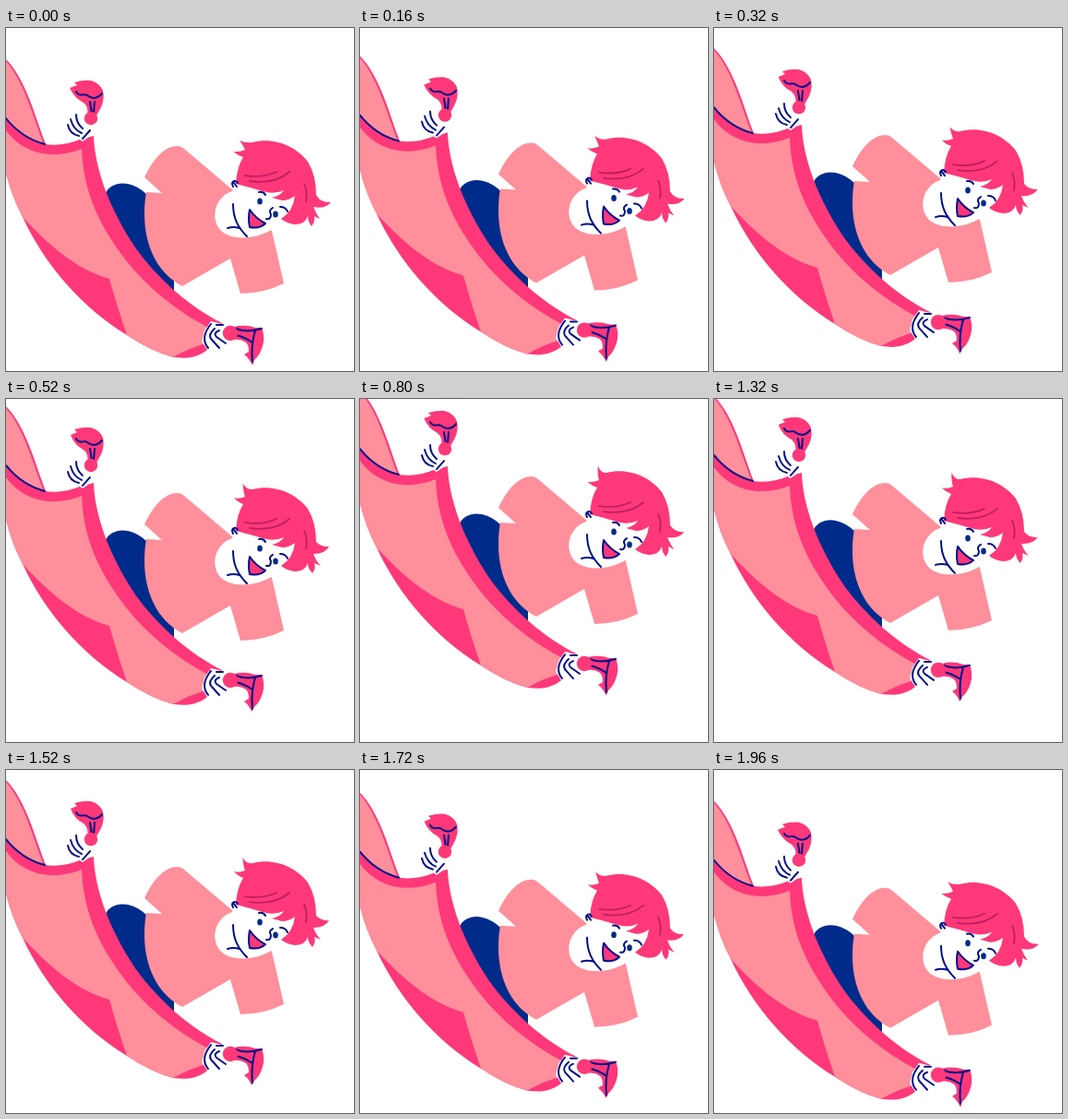
Recreate the animation shown at these times as an HTML page. Size 377 by 372 pixels, loop 2 s.

```html
<!DOCTYPE html>
<html lang="en">
<head>
<meta charset="utf-8">
<title>Flying carpet</title>
<style>
html, body { margin: 0; width: 100%; height: 100%; overflow: hidden; background: #fff; }
svg { display: block; width: 377px; height: 372px; }
.hot { fill: #ff3879; }
.light { fill: #ff8f9b; }
.navy { fill: #002b8b; }
.white { fill: #fff; }
.ink, .strand { fill: none; stroke: #00108a; stroke-width: 2; stroke-linecap: round; stroke-linejoin: round; }
.strand { stroke: #bd1f63; stroke-width: 1.8; }
</style>
</head>
<body>
<svg viewBox="0 0 377 372">
<g id="scene">
  <!-- trousers and shirt -->
  <path class="navy" d="M107 181C111 170 122 167 132 169Q144 172 152 180L182 274V290C150 266 122 225 107 181Z"/>
  <path class="light" d="M150 162C160 141 172 128 186 128Q190 128 193 131L246 176L288 220L301 277Q279 288 254 288L243 250L191 280C164 266 150 236 150 202Q150 188 152 178L169 179Z"/>

  <!-- carpet -->
  <path class="hot" d="M0 34C22 56 32 98 43 126L0 112Z"/>
  <path class="light" d="M0 36C20 58 30 99 41 126L0 112Z"/>
  <path class="hot" d="M0 98C12 113 27 122 42 126Q62 129 82 120L95 117C96 152 112 196 140 238C165 273 200 303 234 320L222 346C208 358 197 359 181 357Q158 351 131 333C82 303 42 257 18 205Q6 182 0 157Z"/>
  <path class="light" d="M0 111C20 138 52 143 82 131C84 180 102 215 130 252C152 280 183 306 221 326L217 342Q201 346 181 357Q158 351 131 333Q120 301 112 272C74 261 45 234 18 205Q6 182 0 157Z"/>
  <path class="ink" d="M0 98C12 113 27 122 42 126"/>

  <!-- upper hand and tassel -->
  <path class="white" d="M67 104L76 94L88 101L96 108L93 116L83 123L72 116Z"/>
  <path class="ink" d="M67 105Q69 115 79 117M70 99Q73 110 82 114M76 94Q76 103 83 109M83 120L91 111"/>
  <path id="topTassel" class="hot"/>
  <path class="ink" d="M76 69C80 76 84 70 88 73C94 78 100 76 104 71M91 80L93 93M96 80L95 92"/>
  <circle class="hot" cx="92" cy="98" r="7.2"/>

  <!-- lower hand and tassel -->
  <path class="white" d="M222 318L234 321L240 329L239 341L229 348L218 349L212 340L215 328Z"/>
  <path class="ink" d="M222 321C214 331 213 340 219 347M226 326Q219 332 222 337L231 347M231 328Q224 331 228 335L238 342M228 322L235 322"/>
  <path id="lowTassel" class="hot"/>
  <path class="ink" d="M249 326Q260 331 277 326M249 333Q258 335 267 341M270 328Q265 345 267 362"/>
  <circle class="hot" cx="243" cy="331" r="8.2"/>

  <!-- head -->
  <path class="white" d="M245 177C225 184 221 208 233 220C245 231 271 229 287 219C303 210 313 196 314 184L290 160L250 166Z"/>
  <path id="hair" class="hot"/>
  <path class="strand" d="M259 160Q279 163 293 156M264 166Q291 170 307 156M323 169Q327 178 325 188"/>
  <path class="ink" d="M246 172C243 166 249 164 251 168M247 168L250 172M246 191C246 206 251 216 261 226M240 217Q246 215 253 217M274 178Q279 177 281 181M297 194Q303 194 305 199M289 195Q284 198 287 202Q287 208 282 207"/>
  <ellipse class="navy" cx="275" cy="188" rx="2.8" ry="3.5"/>
  <ellipse class="navy" cx="292" cy="202" rx="2.8" ry="3.5"/>
  <path class="ink" style="fill:#ff3879" d="M264 197Q271 207 281 212Q275 218 264 216Q262 207 264 197Z"/>
</g>
</svg>
<script>
const LOOP = 2000, LIFT = 49;
const get = id => document.getElementById(id);
const scene = get('scene'), hair = get('hair');
const topTassel = get('topTassel'), lowTassel = get('lowTassel');
const smooth = x => x * x * (3 - 2 * x);

// flick lifts the crown tips, sway moves the loose ends
function hairPath(flick, sway) {
  const tip = `${253 + 5 * flick} ${122 - 6 * flick}`;
  return `M${tip}Q${259 + 2 * flick} 125 267 124C290 118 314 128 327 145Q336 160 336 181
    Q${341 + sway} ${190 - 3 * sway} ${352 - 2 * sway} ${189 - 3 * sway}
    Q${345 + sway} ${197 - 3 * sway} 333 194
    Q336 202 ${340 + sway} 207L334 204
    Q${335 + sway} 210 ${331 + sway} 215Q327 210 327 204
    Q324 213 313 213Q304 212 298 207Q311 199 313 182
    Q307 187 299 187L288 184Q297 182 301 176
    Q290 181 278 177Q265 173 249 169
    Q250 151 257 140Q251 138 ${246 + sway} ${134 - sway}Q252 135 259 132Q257 127 ${tip}Z`;
}

function draw(now) {
  const t = now % LOOP / LOOP;
  const rise = LIFT * smooth(1 - Math.abs(2 * t - 1));
  const flick = Math.sin(Math.PI * t);
  const sway = (1 - Math.cos(4 * Math.PI * t)) / 2;
  scene.setAttribute('transform', `translate(0 ${-rise})`);
  hair.setAttribute('d', hairPath(flick, sway));
  topTassel.setAttribute('d', `M${69 + sway} 65L77 62L74 59Q84 56 92 57Q102 60 105 68
    Q107 77 103 86L98 95H88Q90 86 84 81Q74 76 ${69 + sway} 65Z`);
  lowTassel.setAttribute('d', `M247 324Q259 321 270 325L277 325Q281 335 278 345
    Q275 355 269 360L${267 - sway} ${366 - sway}Q264 359 258 354L263 351Q263 344 260 341Q254 337 247 338Z`);
  requestAnimationFrame(draw);
}
draw(0);
</script>
</body>
</html>
```
